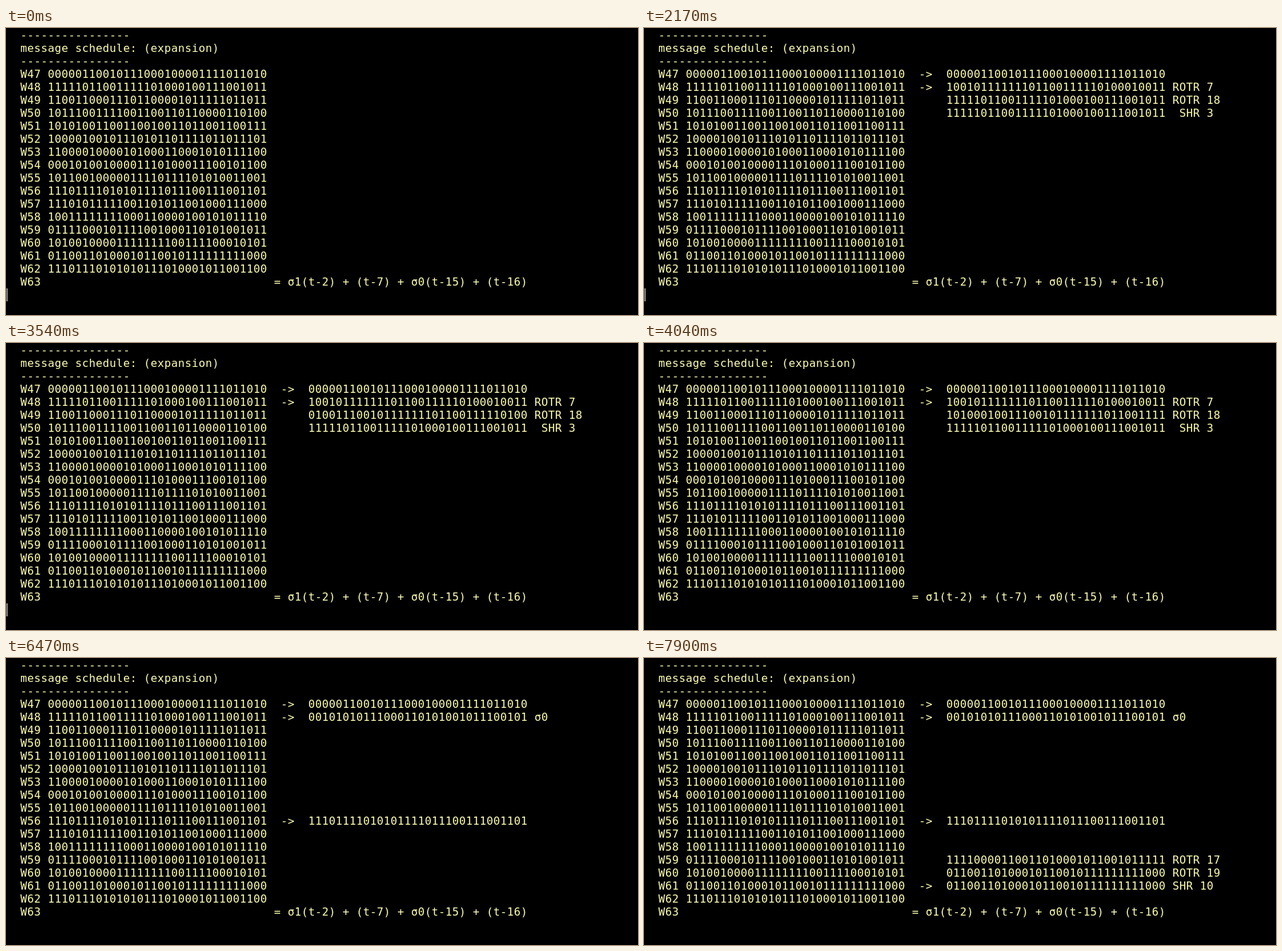
An HTML page that plays this animation: 922x420 px, repeating every 8 s.

```html
<!DOCTYPE html>
<html lang="en">
<head>
<meta charset="utf-8">
<title>Message schedule expansion</title>
<style>
  html, body { margin: 0; width: 100%; height: 100%; overflow: hidden; background: #000; }
  #screen {
    position: absolute; left: 1px; top: 1px; margin: 0;
    font: 16px/19px "DejaVu Sans Mono", monospace;
    letter-spacing: calc(10px - 1ch); /* 10px terminal cells */
    font-variant-ligatures: none;
    color: #ffffaf;
  }
  #cursor { position: absolute; left: 1px; top: 381px; width: 1px; height: 19px; background: #fff; }
</style>
</head>
<body>
<pre id="screen"></pre>
<div id="cursor"></div>
<script>
const LOOP = 8000, FPS = 30, STEP = 104, FIRST = 47;
const words = [
  0x065c43da, 0xfb3e89cb, 0xcc7617db, 0xb9e66c34, 0xa9993667, 0x84badedd, 0xc21462bc, 0x1487472c,
  0xb20f7a99, 0xef57b9cd, 0xebe6b238, 0x9fe3095e, 0x78bc8d4b, 0xa43fcf15, 0x668b2ff8, 0xeeaba2cc
];
const W = i => words[i - FIRST];
const bits = x => (x >>> 0).toString(2).padStart(32, "0");
const rotr = (x, n) => n ? (x >>> n) | (x << (32 - n)) : x;

// Number of one-bit moves made by time t
const moves = (t, start, max) =>
  Math.max(0, Math.min(max, Math.floor((t - start) / STEP) + 1));

// Right-hand column: row number -> { arrow, value, label }
function workings(t) {
  const rows = {};
  const put = (row, value, label = "", arrow = false) => { rows[row] = { value, label, arrow }; };

  if (t > 390) put(47, W(47), "", true);

  if (t > 760) {
    const a = rotr(W(48), moves(t, 1148, 7));
    const b = rotr(W(48), moves(t, 2265, 18));
    const c = W(48) >>> moves(t, 4532, 3);
    if (t < 5260) {
      put(48, a, "ROTR 7", true);
      put(49, b, "ROTR 18");
      put(50, c, " SHR 3");
    } else if (t < 5660) {
      put(48, a, "", true);
      put(49, b);
      put(50, c, "XOR");
    } else if (t < 6060) {
      put(48, a, "", true);
      put(49, b ^ c, "XOR");
    } else {
      put(48, a ^ b ^ c, "σ0", true);
    }
  }

  if (t > 6460) put(56, W(56), "", true);

  if (t > 6860) {
    put(59, rotr(W(61), moves(t, 7247, 17)), "ROTR 17");
    put(60, W(61), "ROTR 19");
    put(61, W(61), "SHR 10", true);
  }
  return rows;
}

function page(t) {
  const rule = "-".repeat(16);
  const lines = [rule, "message schedule: (expansion)", rule];
  const side = workings(t);
  words.forEach((word, i) => {
    const n = FIRST + i, s = side[n];
    let line = `W${n} ${bits(word)}`;
    if (s) line += `  ${s.arrow ? "->" : "  "}  ${bits(s.value)} ${s.label}`;
    lines.push(line);
  });
  lines.push("W63".padEnd(37) + "= σ1(t-2) + (t-7) + σ0(t-15) + (t-16)");
  return lines.map(l => "  " + l).join("\n");
}

const screenEl = document.getElementById("screen");
const cursorEl = document.getElementById("cursor");
const begin = performance.now();
let last = -1;

function draw() {
  const tick = Math.floor(((performance.now() - begin) % LOOP) * FPS / 1000 + 1e-6);
  if (tick !== last) {
    last = tick;
    screenEl.textContent = page(tick * 1000 / FPS);
    // Blink: 18 ticks on, 18 off
    cursorEl.style.visibility = Math.floor((tick + 7) / 18) % 2 ? "hidden" : "visible";
  }
  requestAnimationFrame(draw);
}
draw();
</script>
</body>
</html>
```
